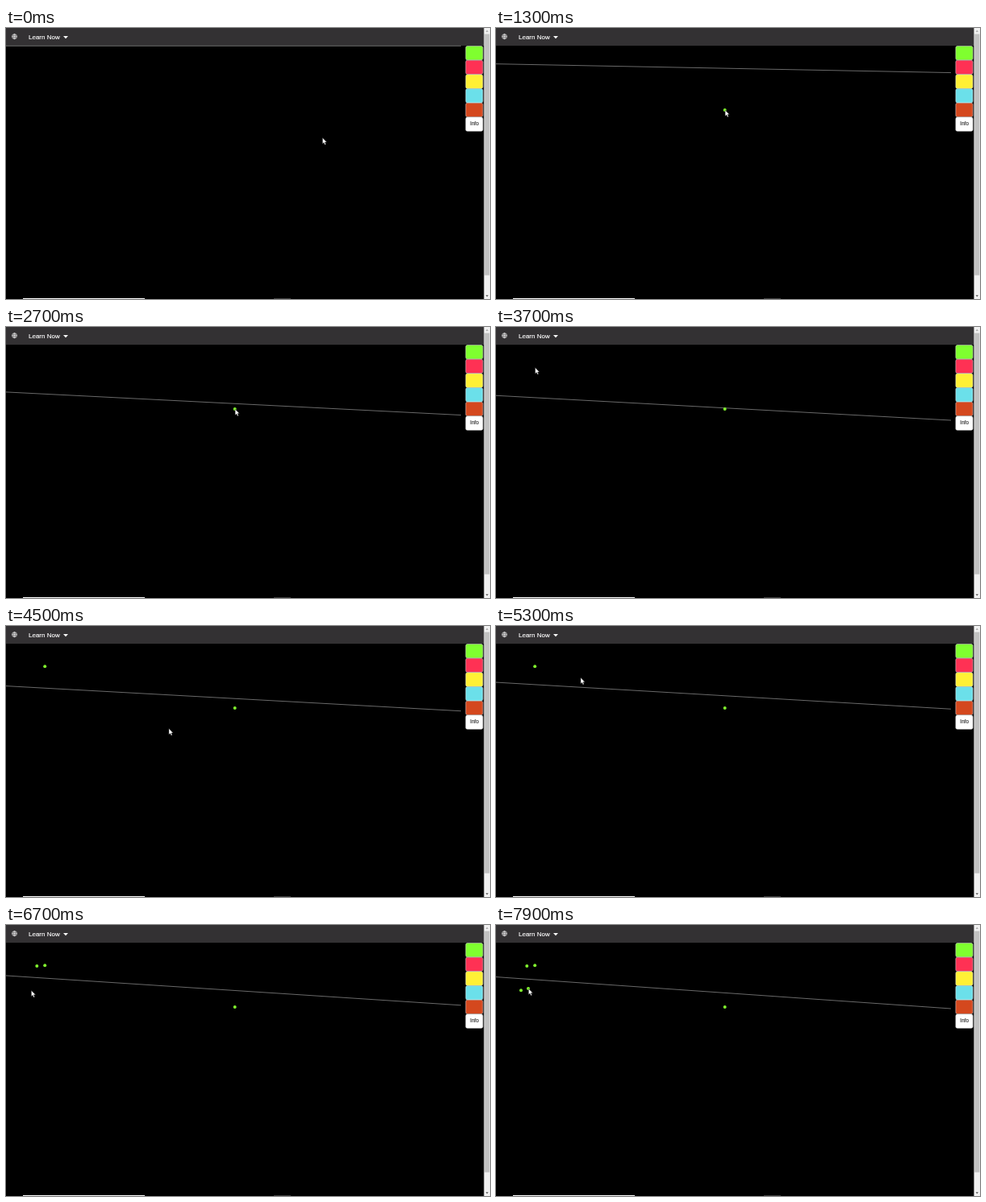
Animation, 600 px wide and 337 px high, one loop 8000 ms. Source, as an HTML page:

```html
<!DOCTYPE html>
<html lang="en">
<head>
<meta charset="utf-8">
<title>Linear regression</title>
<style>
  html, body { margin: 0; width: 100%; height: 100%; overflow: hidden; background: #000; }
  svg { display: block; width: 100vw; height: 100vh; }
  text { font-family: "Liberation Sans", Arial, sans-serif; stroke-width: .15; }
  .swatch { stroke: #e4e4e4; stroke-width: .5; }
  .globe { fill: none; stroke: #fff; stroke-width: .6; }
</style>
</head>
<body>
<svg viewBox="0 0 600 337" preserveAspectRatio="none">
  <rect width="600" height="337"/>
  <rect width="593" height="22" fill="#333133"/>

  <line id="fit" x1="0" x2="564" stroke="#8c8c8c" stroke-width=".75"/>
  <g id="dots" fill="#80f52e"></g>

  <g class="globe">
    <circle cx="10.5" cy="10.6" r="3"/>
    <ellipse cx="10.5" cy="10.6" rx="1.4" ry="3"/>
    <path d="M7.5 10.6h6M10.5 7.6v6"/>
  </g>
  <text x="28" y="14" font-size="8" fill="#fff" stroke="#fff">Learn Now</text>
  <path d="M71 10h6l-3 3.2z" fill="#fff"/>

  <g id="swatches"></g>
  <text x="580.7" y="121.2" font-size="6.4" fill="#333" stroke="#333" text-anchor="middle">Info</text>

  <rect x="592.5" width="7.5" height="337" fill="#f1f1f1"/>
  <rect x="593.2" y="7.5" width="6.2" height="300" fill="#c1c1c1"/>
  <path d="M594.6 4.8h3.4l-1.7-2z" fill="#a3a3a3"/>
  <path d="M594.6 332.2h3.4l-1.7 2z" fill="#505050"/>
  <rect x="21" y="336" width="151" height="1" fill="#fff"/>
  <rect x="332" y="336" width="21" height="1" fill="#3c3c3c"/>

  <path id="cursor" d="M0 0V7.4L1.7 5.9L2.8 8.6L4.1 8L3 5.4H5.2Z"
        fill="#fff" stroke="#222" stroke-width=".4"/>
</svg>
<script>
  const LOOP = 8000, TICK = 100, RATE = 0.107;
  const SPAN = 580, TOP = 22.3;
  const NS = "http://www.w3.org/2000/svg";
  const byId = id => document.getElementById(id);

  function add(parent, tag, attrs) {
    const el = document.createElementNS(NS, tag);
    for (const key in attrs) el.setAttribute(key, attrs[key]);
    return parent.appendChild(el);
  }

  ["#7fff2f", "#ff3154", "#fff035", "#6be0ea", "#d4481e", "#fff"].forEach((fill, i) =>
    add(byId("swatches"), "rect", {
      class: "swatch", x: 569.9, y: 22.5 + i * 17.7, width: 21.2, height: 17.3, rx: 2, fill
    }));

  // Each point is clicked at `click`; the pointer travels there from `leave`
  // to `arrive`, swinging out sideways by `swingX` and `swingY`.
  const home = { x: 392, y: 136.4 };
  const points = [
    { x: 283.7, y: 102, leave: 400, arrive: 700, click: 1100 },
    { x: 48.2, y: 50.3, leave: 2800, arrive: 3600, click: 3800, swingY: -36 },
    { x: 38.3, y: 51, leave: 3900, arrive: 5500, click: 5800, swingX: 170, swingY: 90 },
    { x: 31, y: 81.2, leave: 5900, arrive: 6400, click: 6800 },
    { x: 40, y: 79, leave: 6900, arrive: 7400, click: 7800 }
  ];
  for (const p of points) p.el = add(byId("dots"), "circle", { cx: p.x, cy: p.y, r: 2 });

  function pointerAt(time) {
    let { x, y } = home;
    for (const { x: toX, y: toY, leave, arrive, swingX = 0, swingY = 0 } of points) {
      const k = Math.min(1, Math.max(0, (time - leave) / (arrive - leave)));
      const swing = Math.sin(Math.PI * k);
      x += (toX - x) * k + swingX * swing;
      y += (toY - y) * k + swingY * swing ** 2;
    }
    return [x + 0.4, y + 0.2];
  }

  // Gradient descent of y = m * x + b over the points present at each tick
  function fitAt(time) {
    let m = 0, b = TOP;
    for (let t = points[0].click; t <= time; t += TICK) {
      const seen = points.filter(p => p.click <= t);
      let dm = 0, db = 0;
      for (const p of seen) {
        const x = p.x / SPAN, error = m * x + b - p.y;
        dm += error * x;
        db += error;
      }
      m -= RATE * dm / seen.length;
      b -= RATE * db / seen.length;
    }
    return { m, b };
  }

  const fit = byId("fit"), cursor = byId("cursor");

  function draw(time) {
    const { m, b } = fitAt(time);
    fit.setAttribute("y1", b);
    fit.setAttribute("y2", b + m);
    for (const p of points) p.el.style.display = p.click <= time ? "" : "none";
    cursor.setAttribute("transform", `translate(${pointerAt(time)})`);
  }

  const start = performance.now();
  let last = -1;
  function frame() {
    const elapsed = (performance.now() - start) % LOOP;
    const time = Math.floor(elapsed / TICK) * TICK;
    if (time !== last) draw(last = time);
    requestAnimationFrame(frame);
  }
  frame();
</script>
</body>
</html>
```
